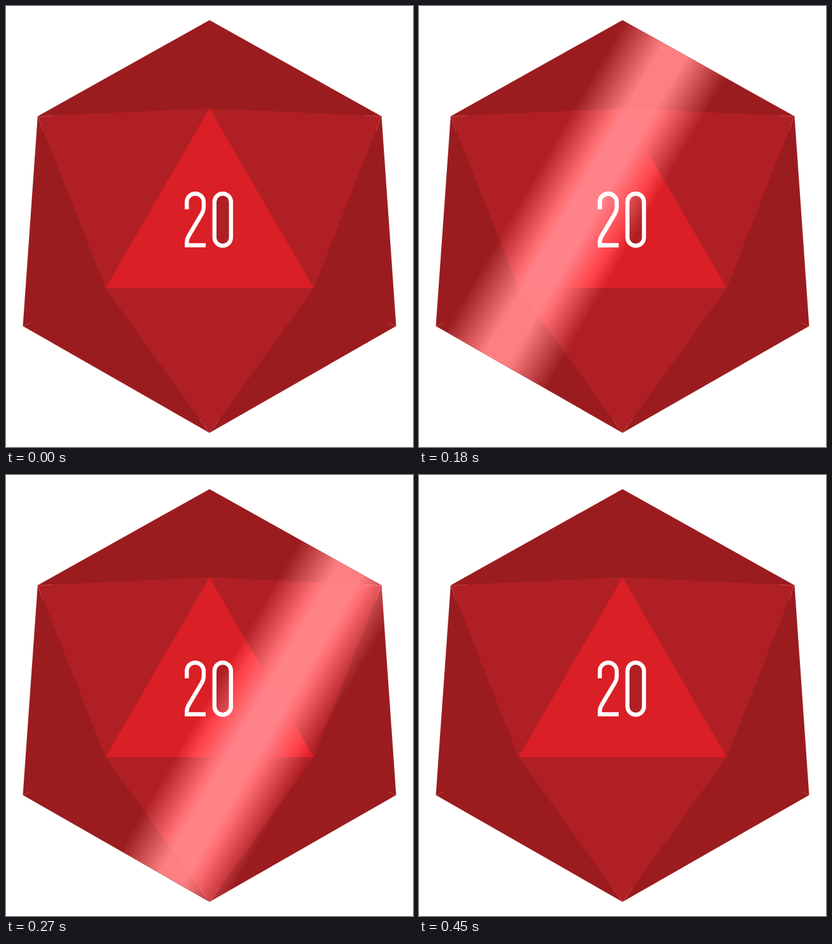
Recreate the animation shown at these times as an HTML page. Size 640 by 694 pixels, loop 4500 ms.

```html
<!DOCTYPE html>
<html lang="en">
<head>
<meta charset="utf-8">
<title>Twenty-sided die</title>
<style>
  html, body { margin: 0; width: 100%; height: 100%; overflow: hidden; background: #fff; }
  svg { display: block; width: 640px; height: 694px; isolation: isolate; }
  .digits { fill: none; stroke: #fff; stroke-width: 6.4; }
  .nicks { fill: none; stroke: #e0a79c; stroke-width: .6; opacity: .55; }

  /* The glint adds light to whatever lies below it. */
  .glint { mix-blend-mode: plus-lighter; }
  .band {
    animation: sweep 4500ms -1ms infinite, show 4500ms -1ms step-end infinite;
  }
  @keyframes sweep {
    0% { transform: translateX(63px); animation-timing-function: steps(15, end); }
    10%, 100% { transform: translateX(863px); }
  }
  @keyframes show {
    0% { opacity: 0; }
    .66666% { opacity: 1; }
    10%, 100% { opacity: 0; }
  }
</style>
</head>
<body>
<svg viewBox="0 0 640 694" role="img" aria-label="20">
  <defs>
    <path id="outline" d="M320 22.3 590.5 173.5 613.5 503.7 320 671.7 26.5 503.7 49.8 173.5Z"/>
    <clipPath id="die"><use href="#outline"/></clipPath>
    <linearGradient id="light">
      <stop offset="0" stop-color="#fff" stop-opacity="0"/>
      <stop offset=".39" stop-color="#fff" stop-opacity=".39"/>
      <stop offset=".61" stop-color="#fff" stop-opacity=".39"/>
      <stop offset="1" stop-color="#fff" stop-opacity="0"/>
    </linearGradient>
  </defs>

  <use href="#outline" fill="#9b1c1f"/>
  <path fill="#af1f23" d="M49.8 173.5 320 161 590.5 173.5 484 444 320 671.7 156.500 444Z"/>
  <path fill="#da1f26" d="M320 161 484 444H156.500Z"/>

  <g class="nicks">
    <path d="M50 174 75 172.500M51 176 58 197M590 174 565 172.500M589 176 582 197"/>
    <path d="M27 503.500 40 498.500M613 503.500 600 498.500M319.500 671 304.500 650M320.500 671 335.500 650"/>
  </g>

  <g class="digits">
    <path d="M284.300 320V308.500a13.300 13.300 0 0 1 26.600 0V317q0 5-3 10.200L287.200 362q-2.900 4.800-2.900 10V376.500H314"/>
    <rect x="327.800" y="295.200" width="26" height="82" rx="13" fill="#af1f23"/>
  </g>

  <g class="glint" clip-path="url(#die)">
    <g transform="rotate(30)">
      <rect class="band" x="-92" y="-250" width="184" height="900" fill="url(#light)"/>
    </g>
  </g>
</svg>
</body>
</html>
```
